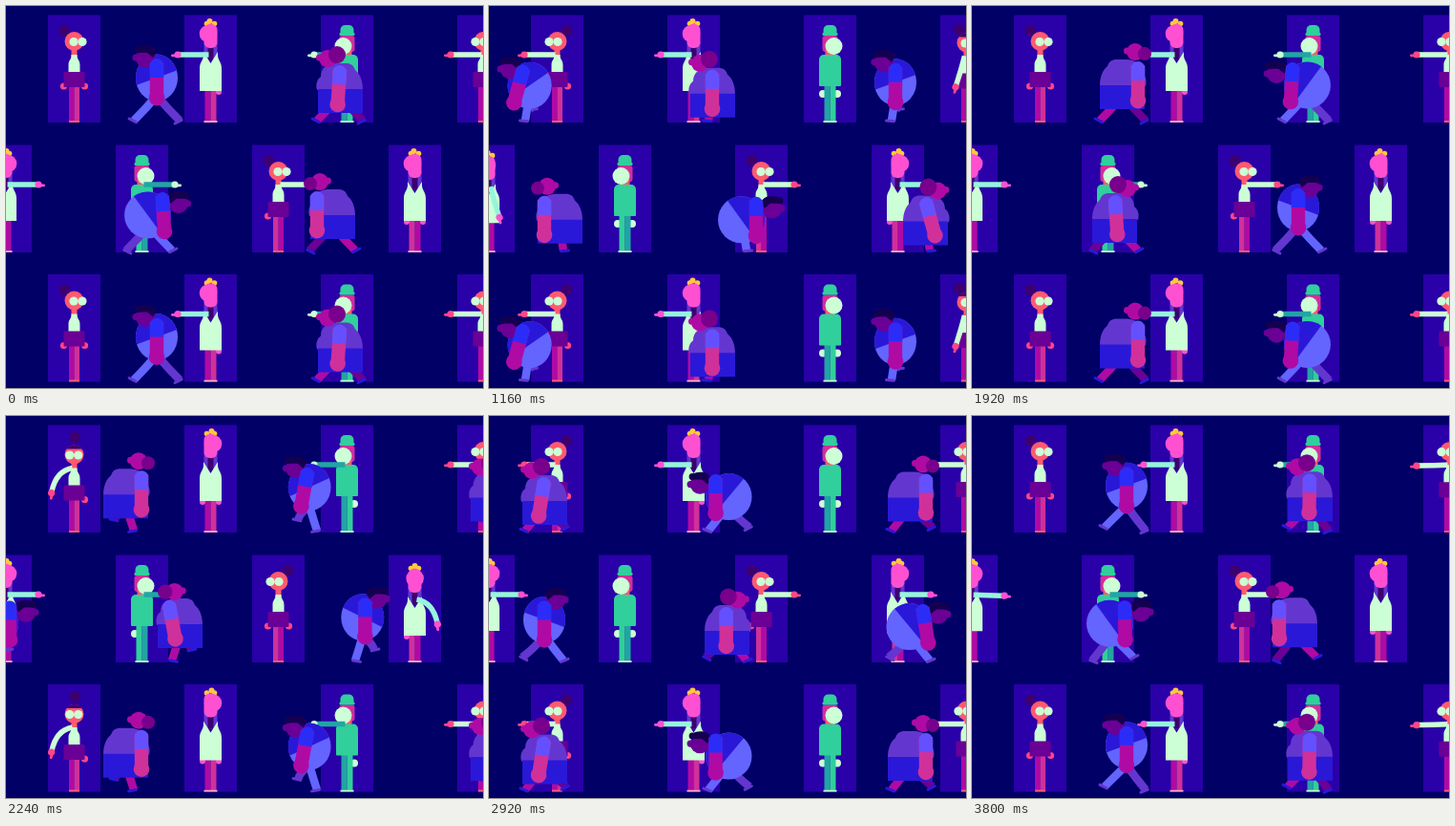
Animation, 500 px wide and 400 px high, one loop 3840 ms. Source, as an HTML page with a canvas:

```html
<!DOCTYPE html>
<html>
<head>
<meta charset="utf-8">
<style>
  html, body { margin: 0; width: 500px; height: 400px; overflow: hidden; background: #000066; }
  canvas { display: block; }
</style>
</head>
<body>
<canvas id="stage" width="500" height="400"></canvas>
<script>
const ctx = document.getElementById('stage').getContext('2d');
const LOOP = 3840, STEP = 480, SPEED = 0.1, GAP = 192, DOOR = 143, STRIDE = 48;
const C = {
  night: '#000066', panel: '#2a00a8', mint: '#ccffd6', aqua: '#96f5dc', coral: '#ff5a70',
  rose: '#d0309a', magenta: '#b00aa4', plum: '#6a0096', bun: '#78008c', dark: '#3c0070',
  hair: '#140050', pink: '#ff50d2', hand: '#ff4688', yellow: '#ffc83c', green: '#30cf9c',
  teal: '#22a4a4', blue: '#2a18d8', shirt: '#2c2cf8', light: '#6464ff', violet: '#6436d0',
  lilac: '#6450ff'
};

const clamp = v => Math.max(0, Math.min(1, v));
const mix = (a, b, k) => a + (b - a) * k;
const smooth = (from, to, v) => {
  const k = clamp((v - from) / (to - from));
  return k * k * (3 - 2 * k);
};
// Signed offset to the nearest multiple of size
const wrap = (v, size) => v - size * Math.round(v / size);

function circle(x, y, r, color) {
  ctx.fillStyle = color;
  ctx.beginPath();
  ctx.arc(x, y, r, 0, 7);
  ctx.fill();
}
function box(x, y, w, h, color, radius = 0) {
  ctx.fillStyle = color;
  ctx.beginPath();
  ctx.roundRect(x, y, w, h, radius);
  ctx.fill();
}
function shape(path, color) {
  ctx.fillStyle = color;
  ctx.fill(new Path2D(path));
}
function curve(x0, y0, cx, cy, x1, y1, width, color) {
  ctx.strokeStyle = color;
  ctx.lineWidth = width;
  ctx.beginPath();
  ctx.moveTo(x0, y0);
  ctx.quadraticCurveTo(cx, cy, x1, y1);
  ctx.stroke();
}
function at(x, y, draw, angle = 0, sx = 1, sy = 1) {
  ctx.save();
  ctx.translate(x, y);
  ctx.rotate(angle);
  ctx.scale(sx, sy);
  draw();
  ctx.restore();
}

// All figures face left with the origin on the ground.
// d is how far the nearest walker still is from a door; negative once past it.

function pose(d) {
  const raising = d > 0;
  const k = raising ? smooth(66, 44, d) : smooth(-78, -62, d);
  const side = 1 - 2 * k;
  return { raising, k, side, dip: 20 * k * (1 - k) };
}

function pointingArm({ k, raising }, sleeve, hand) {
  if (k < 0.02) return;
  const a = Math.pow(k, 1.4) * Math.PI / 2;
  const hx = -9 - 24 * Math.sin(a), hy = -71 + 31 * Math.cos(a);
  const bend = 4 * k * (1 - k);
  const cx = mix(hx / 2, raising ? -19 : -8, bend);
  const cy = mix((hy - 71) / 2, raising ? -68 : -50, bend);
  curve(-2, -71, cx, cy, hx, hy, 5.5, sleeve);
  at(hx, hy, () => {
    circle(1.5, 0, 3.6, hand);
    box(1, -2.2, 7.5, 2.8, hand, 1.4);
  }, Math.atan2(hy - cy, hx - cx));
}

function restingHands(p, x, y, r, color) {
  circle(x, y, r, color);
  if (p.k < 0.02) circle(-x, y, r, color);
}

function secretary(p) {
  box(-5.5, -40, 5.5, 39, C.magenta);
  box(0, -40, 5.5, 39, C.rose);
  box(-5.5, -2, 11, 2, C.coral);
  at(0, p.dip * 0.7, () => {
    circle(-10 * p.side, -96 - 7 * (1 - p.side * p.side), 6, C.dark);
    restingHands(p, 11, -38, 3.6, C.hand);
    box(-3, -78, 6, 10, C.coral);
    circle(0, -85, 10, C.coral);
    if (Math.abs(p.side) < 0.8) shape('M-8-91A10 10 0 0 1 8-91Z', C.dark);
    circle(4 * p.side - 4.5, -84.5, 4.6, C.mint);
    circle(4 * p.side + 4.5, -84.5, 4.6, C.mint);
    shape('M-3-71H3C3-65 6-66 6-60V-52H-6V-60C-6-66-3-65-3-71Z', C.mint);
    box(-11, -53, 22, 16, C.plum, 1);
    pointingArm(p, C.mint, C.hand);
  });
}

function clerk(p) {
  box(-6, -40, 6, 39, C.magenta);
  box(0, -40, 6, 39, C.rose);
  box(-7, -1.8, 14, 1.8, '#ffb0c8');
  at(0, p.dip, () => {
    restingHands(p, 8.5, -32, 3, C.pink);
    circle(p.side, -106, 3, C.yellow);
    circle(-4, -103.5, 2.8, C.yellow);
    circle(4, -103.5, 2.8, C.yellow);
    box(-7, -84, 14, 18, C.violet);
    box(-3, -84, 6, 18, C.dark);
    box(-7, -103, 14, 25, C.pink, 6);
    circle(2.5 * p.side, -93, 9.3, C.pink);
    shape('M-7.5-74L0-62L7.5-74V-70C8-64 11.5-64 11.5-56V-33H-11.5V-56C-11.5-64-8-64-7.5-70Z', C.mint);
    pointingArm(p, C.aqua, C.pink);
  });
}

function guard(p) {
  restingHands(p, 7.5, -30, 4, C.mint);
  box(-6, -40, 6, 39, C.teal);
  box(0, -40, 6, 39, C.green);
  box(-7, -1.8, 14, 1.8, C.mint);
  at(0, p.dip * 1.4, () => {
    box(-8, -91, 16, 17, C.rose, 3);
    box(-5, -76, 10, 8, C.coral);
    box(-11.5, -71, 23, 33, C.green, [5, 5, 1, 1]);
    box(-7, -102, 14, 10.5, C.green, [5, 5, 0, 0]);
    box(-8, -94, 16, 3, C.green, 1);
    circle(4 * p.side, -80, 9, C.mint);
    pointingArm(p, C.teal, C.mint);
  });
}

function leg(x, y, color, shoe) {
  curve(0, -28, x * 0.5 + y * 0.5, -14 + y * 0.4, x, y - 2, 8.5, color);
  at(x, y - 1.5, () => box(-7, -1.5, 11, 3, shoe, 1.5), -x * 0.02);
}

function legs(t, near, far, shoe) {
  const step = Math.floor(t / STEP), q = t / STEP - step;
  const half = STRIDE / 2;
  const stance = [-half + STRIDE * q, 0];
  const swing = [half - STRIDE * q * q * (3 - 2 * q), -13 * Math.sin(Math.PI * q)];
  const odd = step % 2;
  leg(...(odd ? stance : swing), far, shoe);
  leg(...(odd ? swing : stance), near, shoe);
}

// The body sinks after each footfall and rises before the next.
const bob = t => 2.5 + 4.5 * Math.sin(2 * Math.PI * (t / STEP - 0.05));
const duck = d => smooth(64, 28, d) * smooth(-50, -4, d);
const armSwing = d => 0.27 * smooth(0, -24, d) * smooth(-52, -32, d);

function hangingArm(x, y, angle, sleeve, skin) {
  at(x, y, () => {
    box(-7.2, 0, 14.4, 38, skin);
    circle(0, 37, 8.3, skin);
    box(-7.2, -4, 14.4, 20, sleeve, [7, 7, 0, 0]);
  }, angle);
}

function man(d, t) {
  const b = duck(d);
  legs(t, C.light, C.violet, C.violet);
  at(0, bob(t), () => {
    at(mix(0, 1.5, b), mix(-48, -40, b), () => {
      circle(0, 0, 24.5, C.light);
      const a = Math.PI * (0.9 - 0.2 * b);
      ctx.fillStyle = C.blue;
      ctx.beginPath();
      ctx.arc(0, 0, 24.5, a, a + Math.PI);
      ctx.fill();
    }, 0, mix(0.9, 1, b));
    at(mix(-12, -31, b), mix(-69, -52, b), () => {
      circle(0, 0, 10.3, C.plum);
      circle(-10, 0, 3.6, C.plum);
      shape('M-10-5C-13-13 8-17 12-6L8 0L2-5Z', C.hair);
      circle(-8, -8, 3.5, C.hair);
    });
    hangingArm(mix(0, -14, b), mix(-64, -60, b), armSwing(d), C.shirt, C.magenta);
  });
}

function woman(d, t) {
  const lean = 1 - smooth(52, 32, d) * smooth(-46, -28, d);
  legs(t, C.magenta, C.plum, C.blue);
  at(0, bob(t) + 4 * duck(d), () => {
    const torso = () => {
      shape('M-24-39C-26-46-23-51-20-53C-20-62-13-67-4-67H6C12-67 14-65 16-60C21-56 24-49 24-39Z', C.violet);
      box(-23, -40, 47, 25, C.blue);
    };
    at(0, 0, torso, 0, lean > 0.5 ? -1 : 1);
    at(mix(-13, 13, lean), mix(-72, -75, lean), () => {
      circle(0, 0, 9, C.magenta);
      circle(-8.5, -1, 3.5, C.magenta);
      circle(10, mix(-4, 2, lean), mix(9, 7, lean), C.bun);
    });
    hangingArm(mix(0, 16, lean), -61, armSwing(d), C.lilac, C.rose);
  });
}

function row(ground, t, cast, walkers, flip) {
  const lead = 158 - SPEED * t, first = DOOR / 2;
  at(flip < 0 ? 500 : 0, ground, () => {
    for (let i = 0; i < 4; i++) {
      const x = first + DOOR * i;
      box(x - 27.5, -112.5, 55, 112.5, C.panel);
      at(x, 0, () => cast[i % 3](pose(wrap(lead - x, GAP))));
    }
    for (let k = -1; k < 5; k++) {
      const x = lead + GAP * k;
      at(x, 0, () => walkers[(k + 2) % 2](wrap(x - first, DOOR), t));
    }
  }, 0, flip);
}

function frame(now) {
  const t = Math.floor((now % LOOP) / 40) * 40;
  ctx.fillStyle = C.night;
  ctx.fillRect(0, 0, 500, 400);
  row(122, t, [secretary, clerk, guard], [man, woman], 1);
  row(258, t, [clerk, secretary, guard], [woman, man], -1);
  row(393.5, t, [secretary, clerk, guard], [man, woman], 1);
  requestAnimationFrame(frame);
}
requestAnimationFrame(frame);
</script>
</body>
</html>
```
